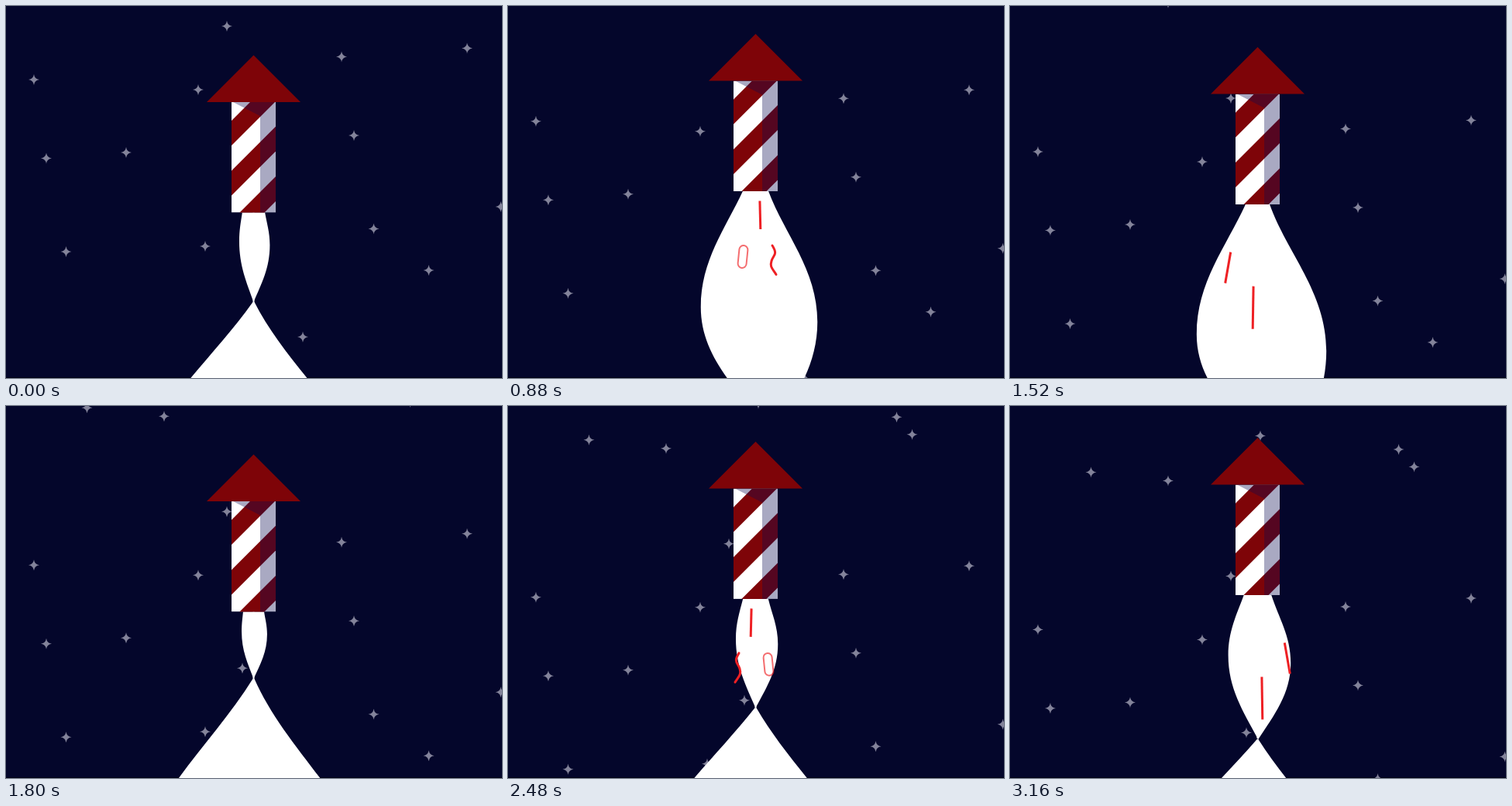
Recreate the animation shown at these times as an HTML page with a canvas. Size 640 by 480 pixels, loop 3200 ms.

```html
<!DOCTYPE html>
<html lang="en">
<head>
<meta charset="utf-8">
<title>Firework rocket</title>
<style>
html, body { margin: 0; width: 100%; height: 100%; overflow: hidden; background: #04062b; }
canvas { display: block; }
</style>
</head>
<body>
<canvas id="stage" width="640" height="480"></canvas>
<script>
const ctx = document.getElementById('stage').getContext('2d');
const LOOP = 3200, STEP = 40, PUFF = 608, BIRTH = -140, BURST = 13.4, AXIS = 319.5;
const RED = '#7e0408', SPARK = '#ee2024', SHADE = 'rgba(10,10,80,.35)';

// The first group of stars appears twice, the copy shifted to the right.
const twins = [[104.5, -108], [36, 95], [52, 196.5], [77.5, 317]];
const singles = [
  [285, 26], [595, 54.5], [248, 108], [155, 189], [257, 310], [545.5, 341],
  [383, 427], [638.5, 259], [305, 228], [204, -97], [521.5, -115], [323, -155]
];
const stars = [...singles, ...twins, ...twins.map(([x, y]) => [x + 397, y - 29.5])];

function fillPoly(color, ...pts) {
  ctx.fillStyle = color;
  ctx.beginPath();
  pts.forEach(([x, y]) => ctx.lineTo(x, y));
  ctx.fill();
}

function drawStar(x, y) {
  const r = 7, c = 1.6;
  ctx.beginPath();
  ctx.moveTo(x, y - r);
  ctx.quadraticCurveTo(x + c / 2, y - c / 2, x + r, y);
  ctx.quadraticCurveTo(x + c / 2, y + c / 2, x, y + r);
  ctx.quadraticCurveTo(x - c / 2, y + c / 2, x - r, y);
  ctx.quadraticCurveTo(x - c / 2, y - c / 2, x, y - r);
  ctx.fill();
  ctx.fillRect(x - c, y - c, 2 * c, 2 * c);
}

// A puff swells out of the nozzle, sinks ever faster, and is pinched off by the next one.
function puffAt(age) {
  const grow = Math.min(1, (age - BIRTH) / -BIRTH);
  const size = (6.3 + .0232 * age) ** 2;
  const attached = age < BIRTH + PUFF;
  const open = Math.sin(Math.PI * (age - BIRTH) / PUFF);
  return {
    attached,
    neck: attached ? 18 * Math.sqrt(Math.max(0, open)) : 0,
    peak: size * grow,
    half: size * (.505 - .0002 * size),
    node: (50 + 1.65 * size) * grow,
    flare: .42 - .2 * Math.exp(-(((age - 460) / 150) ** 2)),
    lag: .1 * Math.min(1, Math.max(0, age / 300) ** 3)
  };
}

function drawPuff(age) {
  const p = puffAt(age);
  const top = p.attached ? 0 : puffAt(age - PUFF).node;
  const w = Math.max(p.neck, 1);
  ctx.fillStyle = '#fff';
  // The right side trails a little behind the left.
  for (const side of [-1, 1]) {
    const skew = 1 + side * .06;
    const m = p.peak * skew, h = side * p.half * skew, n = p.node * (1 + side * p.lag);
    const d = m - top, e = n - m, x = side * w;
    ctx.beginPath();
    ctx.moveTo(0, top);
    ctx.lineTo(x, top);
    ctx.bezierCurveTo(x + (h - x) * (p.flare - side * .05), top + d * .33, h, top + d * .6, h, m);
    ctx.bezierCurveTo(h, m + e * .4, h * .5, m + e * .67, 0, n);
    ctx.fill();
  }
  // Covers the seam between the halves.
  ctx.fillRect(-1, top, 2, p.node * (1 - p.lag) - top);
}

function drawSmoke(t) {
  const age = t % PUFF;
  drawPuff(age + PUFF);
  drawPuff(age);
  if (age - PUFF > BIRTH) drawPuff(age - PUFF);
}

function dash(x1, y1, x2, y2) {
  ctx.lineWidth = 3;
  ctx.beginPath();
  ctx.moveTo(x1, y1);
  ctx.lineTo(x2, y2);
  ctx.stroke();
}

function squiggle(y) {
  ctx.lineWidth = 3;
  ctx.lineCap = 'round';
  ctx.beginPath();
  ctx.moveTo(-21.5, y);
  ctx.bezierCurveTo(-29, y + 12, -23, y + 12, -20.5, y + 20);
  ctx.bezierCurveTo(-18, y + 28, -22, y + 30, -26.5, y + 37.5);
  ctx.stroke();
  ctx.lineCap = 'butt';
}

function pill(y) {
  ctx.save();
  ctx.translate(16.5, y);
  ctx.rotate(-.1);
  ctx.globalAlpha = .65;
  ctx.lineWidth = 2;
  ctx.beginPath();
  ctx.roundRect(-5.5, -14.5, 11, 29, 5.5);
  ctx.stroke();
  ctx.restore();
}

// Sparks fall in bursts; every second burst is mirrored.
function drawSparks(step) {
  const burst = Math.ceil((step + 1) / BURST) - 1;
  const p = step - Math.floor(burst * BURST);
  ctx.save();
  if (burst % 2) ctx.scale(-1, 1);
  ctx.strokeStyle = SPARK;
  const fall = (p - 9) * 28;
  if (p >= 7 && p <= 10) squiggle(70 + fall);
  if (p >= 7 && p <= 9) pill(84.5 + fall);
  if (p === 11) dash(-27, 113, -20.5, 127);
  if (p >= 9) {
    const k = p - 9, y = 12.5 + k * 31;
    dash(-5.4, y, -6.3, y + 36.5 + k * 6.2);
  }
  if (p >= 10) {
    const k = p - 11, x = -29.3 - k * 5.5, y = 35 + k * 26.5;
    dash(x, y, x - 7, y + 35 + k * 5);
  }
  ctx.restore();
}

function drawRocket() {
  const w = 57, h = 142.5;
  ctx.save();
  ctx.translate(-28.5, -h);
  ctx.save();
  ctx.beginPath();
  ctx.rect(0, 0, w, h);
  ctx.clip();
  ctx.fillStyle = '#fff';
  ctx.fillRect(0, 0, w, h);
  for (let s = 24; s < w + h; s += 64.5) {
    const e = s + 32;
    fillPoly(RED, [0, s], [s, 0], [e, 0], [0, e]);
  }
  fillPoly(SHADE, [2, 0], [w, 0], [w, h], [37, h], [37, 18]);
  ctx.restore();
  fillPoly(RED, [-32, 0], [28.5, -60.5], [89, 0]);
  ctx.restore();
}

function draw(t) {
  ctx.fillStyle = '#04062b';
  ctx.fillRect(0, 0, 640, 480);
  ctx.fillStyle = '#010214';
  ctx.fillRect(0, 479, 640, 1);
  ctx.fillStyle = '#83839a';
  for (const [x, y] of stars) drawStar(x, y + t * .0612);

  const bob = 252.5 + 14 * Math.cos(t / 1920 * 2 * Math.PI);
  ctx.save();
  ctx.translate(AXIS, bob);
  drawSmoke(t);
  drawSparks(t / STEP);
  drawRocket();
  ctx.restore();
}

const start = performance.now();
function tick() {
  const t = (performance.now() - start) % LOOP;
  draw(Math.floor(t / STEP) * STEP);
  requestAnimationFrame(tick);
}
tick();
</script>
</body>
</html>
```
